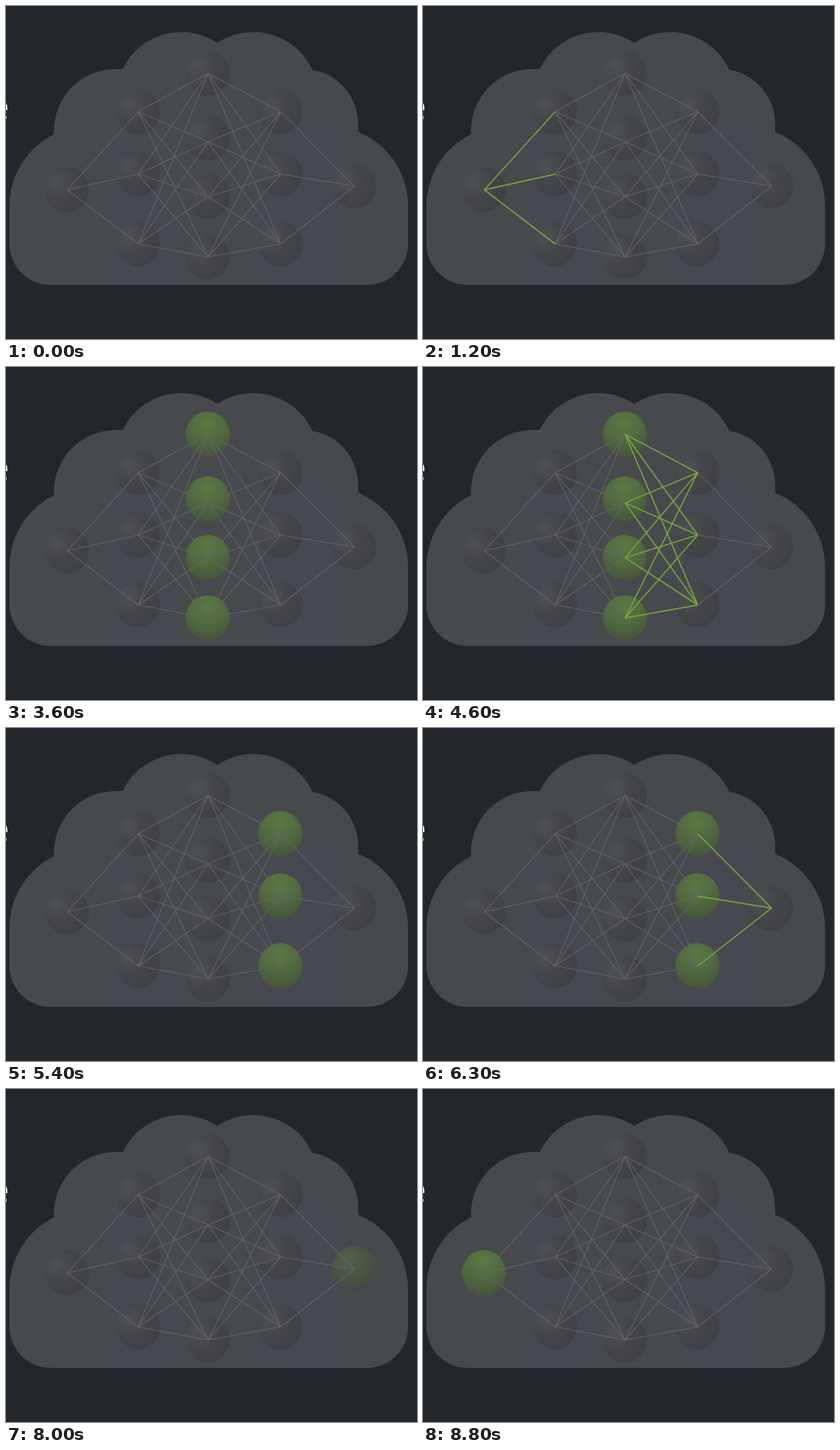
An HTML page for the animation above (9 s loop, 600 by 486 pixels).

```html
<!DOCTYPE html>
<html lang="en">
<head>
<meta charset="utf-8">
<title>Neural network cloud</title>
<style>
  html, body { margin: 0; width: 100%; height: 100%; overflow: hidden; background: #23262a; }
  svg { display: block; width: 100vw; height: 100vh; }
  text { font: 55px "Open Sans", sans-serif; fill: #fff; text-anchor: end; }
  .wire { stroke: #676665; stroke-width: 1.1; }
  .live { stroke: #77a740; stroke-width: 1.7; }
  .lit { opacity: 0; }
</style>
</head>
<body>
<svg viewBox="0 0 600 486">
  <defs>
    <radialGradient id="dark" cx=".27" cy=".33" r=".72">
      <stop offset="0" stop-color="#4e5154"/>
      <stop offset=".5" stop-color="#454649"/>
      <stop offset="1" stop-color="#404145"/>
    </radialGradient>
    <radialGradient id="green" cx=".48" cy=".25" r=".75">
      <stop offset="0" stop-color="#5c7943"/>
      <stop offset=".5" stop-color="#526a40"/>
      <stop offset="1" stop-color="#46553c"/>
    </radialGradient>
    <linearGradient id="tint" x2="0" y2="1">
      <stop offset="0" stop-color="#464950" stop-opacity="0"/>
      <stop offset=".2" stop-color="#464950"/>
    </linearGradient>
  </defs>

  <g fill="#474a4d">
    <circle cx="256" cy="133" r="95"/>
    <circle cx="361" cy="133" r="95"/>
    <path d="M70 182A90 90 0 0 1 160 92H434A80 80 0 0 1 514 172V320H70Z"/>
    <path d="M5 292A117 117 0 0 1 122 175H470A117 117 0 0 1 587 292V347A60 60 0 0 1 527 407H65A60 60 0 0 1 5 347Z"/>
  </g>
  <g fill="url(#tint)">
    <path d="M150 160H242V407H150Z"/>
    <path d="M370 140H466V185H485V407H405Q350 385 350 330L370 280Z"/>
  </g>

  <g id="net"></g>
  <text x="4.8" y="166">e</text>
</svg>
<script>
  const LOOP = 9000, TICK = 100;
  const net = document.getElementById('net');

  // Times in ms: balls light up at `on`, wires to the next layer at `send`,
  // and from `off` the balls go dark in `fade` ticks.
  const layers = [
    { x: 89, ys: [268], on: 400, send: 600, off: 1000, fade: 3 },
    { x: 192.5, ys: [154, 245, 347], on: 1700, send: 2300, off: 3000, fade: 1 },
    { x: 294.5, ys: [98, 192.5, 278, 366], joints: [98, 198, 278, 366], on: 3600, send: 4200, off: 4800, fade: 2 },
    { x: 400.5, ys: [154, 245, 347], on: 5400, send: 5900, off: 6500, fade: 2 },
    { x: 508.3, ys: [262.5], on: 7100, off: 7600, fade: 9 }
  ];

  function add(parent, tag, attrs) {
    const el = document.createElementNS('http://www.w3.org/2000/svg', tag);
    for (const name in attrs) el.setAttribute(name, attrs[name]);
    return parent.appendChild(el);
  }

  function pulse(el, on, off, fade = 0) {
    const key = (time, opacity, ticks = 1) =>
      ({ offset: time / LOOP, opacity, easing: `steps(${ticks}, ${ticks > 1 ? 'start' : 'end'})` });
    const dark = off + Math.max(0, fade - 1) * TICK;
    const frames = [key(0, 0), key(on, 1), key(off, fade > 1 ? 1 - 1 / fade : 0, 1)];
    for (let i = 2; i <= fade; i++) frames.push(key(off + (i - 1) * TICK, 1 - i / fade));
    frames.push(key(Math.max(dark, LOOP), 0));
    el.animate(frames, { duration: LOOP, iterations: Infinity });
  }

  function drawBalls({ x, ys }, fill, cls) {
    const group = add(net, 'g', { class: cls, fill: `url(#${fill})` });
    for (const cy of ys) add(group, 'ellipse', { cx: x, cy, rx: 32.3, ry: 33 });
    return group;
  }

  function drawWires(from, to, cls) {
    const group = add(net, 'g', { class: cls });
    for (const y1 of from.joints ?? from.ys)
      for (const y2 of to.joints ?? to.ys)
        add(group, 'line', { x1: from.x + .5, y1: y1 + .3, x2: to.x + .5, y2: y2 + .3 });
    return group;
  }

  for (const layer of layers) {
    drawBalls(layer, 'dark', 'ball');
    pulse(drawBalls(layer, 'green', 'lit'), layer.on, layer.off, layer.fade);
  }
  // The first ball blinks once more just before the loop restarts.
  pulse(drawBalls(layers[0], 'green', 'lit'), 8800, LOOP);

  const links = layers.slice(1).map((to, i) => [layers[i], to]);
  for (const [from, to] of links) drawWires(from, to, 'wire');
  for (const [from, to] of links) pulse(drawWires(from, to, 'live lit'), from.send, to.on);
</script>
</body>
</html>
```
